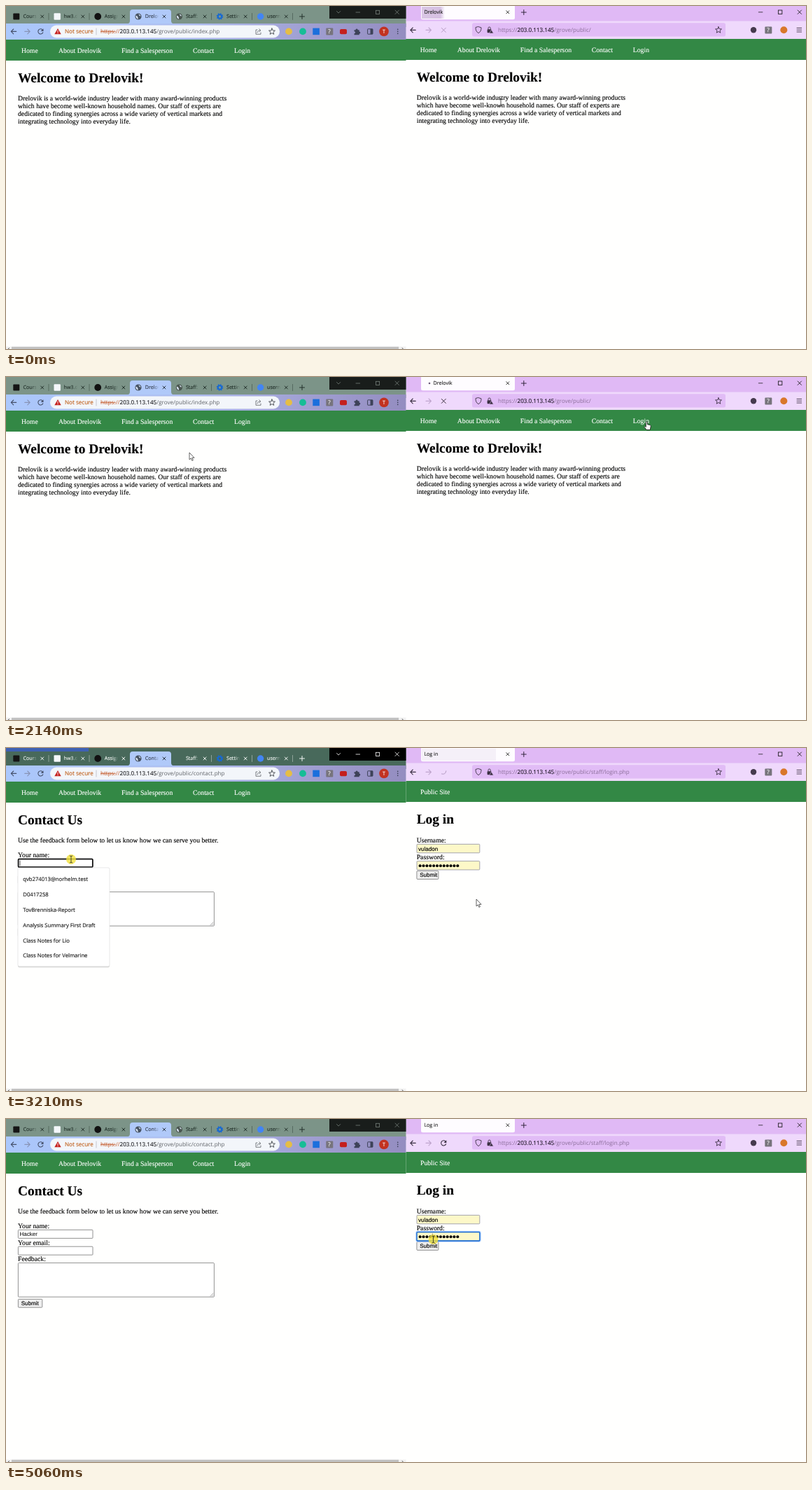
These frames come from a looping animation (1143 by 490 pixels, 8000 ms). An HTML page:

```html
<!DOCTYPE html>
<html lang="en">
<head>
<meta charset="utf-8">
<title>Two browsers</title>
<style>
  html, body { margin: 0; width: 100%; height: 100%; overflow: hidden; background: #fffffe; }
  svg { display: block; width: 1143px; height: 490px; text-rendering: geometricPrecision; }
  text { white-space: pre; stroke-width: .14px; }
  .page { font: 9.71px "Liberation Serif", "Times New Roman", serif; }
  .h1 { font: bold 19.4px "Liberation Serif", "Times New Roman", serif; }
  .ui { font: 8.08px "Open Sans", "Noto Sans", sans-serif; }
  .tab { font: 7.1px "Open Sans", "Noto Sans", sans-serif; }
  .menu { font: 7.7px "Open Sans", "Noto Sans", sans-serif; }
  .field { font: 8.05px "Liberation Sans", Arial, sans-serif; }
  .line { fill: none; stroke-linecap: round; stroke-linejoin: round; }
</style>
</head>
<body>
<svg id="stage" viewBox="0 0 1143 490" xmlns="http://www.w3.org/2000/svg"></svg>
<script>
const LOOP = 8000;
const BRAND = "Drelovik";
const HOST = "203.0.113.145";

// Drawing helpers; "on" lists the time spans in which a group is visible.
const text = (x, y, s, cls = "page", fill = "#000") =>
  `<text x="${x}" y="${y}" class="${cls}" fill="${fill}" stroke="${fill}">${s}</text>`;
const rect = (x, y, w, h, fill, more = "") =>
  `<rect x="${x}" y="${y}" width="${w}" height="${h}" fill="${fill}" ${more}/>`;
const dot = (x, y, r, fill, more = "") =>
  `<circle cx="${x}" cy="${y}" r="${r}" fill="${fill}" ${more}/>`;
const line = (d, color, w = 1, more = "") =>
  `<path class="line" d="${d}" stroke="${color}" stroke-width="${w}" ${more}/>`;
const at = (x, y, body) => `<g transform="translate(${x} ${y})">${body}</g>`;
const on = (spans, body) => `<g data-on="${spans}">${body}</g>`;

// Icons
const cross = (x, y, r, c, w = 1) =>
  line(`M${x - r} ${y - r}l${2 * r} ${2 * r}m0 ${-2 * r}l${-2 * r} ${2 * r}`, c, w);
const plus = (x, y, c) => line(`M${x - 3.5} ${y}h7m-3.5 -3.5v7`, c);
const back = (x, y, c) => line(`M${x + 3.7} ${y}h-7.4m3.4 -3.4l-3.4 3.4l3.4 3.4`, c, 1.1);
const forward = (x, y, c) => line(`M${x - 3.7} ${y}h7.4m-3.4 -3.4l3.4 3.4l-3.4 3.4`, c, 1.1);
const reload = (x, y, c) => at(x, y,
  line("M3.3 1.3A3.6 3.6 0 1 1 2.6 -2.5", c, 1.1) + `<path d="M4 -4.2v3.8h-3.8z" fill="${c}"/>`);
const globe = (x, y, c) => at(x, y, dot(0, 0, 4.6, c) +
  `<path d="M-3.6 -1.6Q-1 -1 -.8 .8L-.2 3.6Q-3.6 3 -3.6 -1.6M.3 -3.6Q1.2 -1.8 2 -.7L3.6 -.5Q3 -3 .3 -3.6" fill="#dbe6f5"/>`);
const star = (x, y, c) => {
  const pts = [...Array(10)].map((_, i) => {
    const r = i % 2 ? 2.1 : 4.7, a = i * Math.PI / 5;
    return `${(x + r * Math.sin(a)).toFixed(2)} ${(y - r * Math.cos(a)).toFixed(2)}`;
  });
  return line(`M${pts.join("L")}Z`, c, 0.9);
};
const gear = (x, y, c) => dot(x, y, 2.7, "none", `stroke="${c}" stroke-width="2"`) +
  dot(x, y, 4, "none", `stroke="${c}" stroke-width="1.6" stroke-dasharray="1.6 1.54"`);
const help = (x, y) => rect(x - 5, y - 5, 10, 10, "#77747c", 'rx="1"') +
  text(x - 2, y + 3, "?", "ui", "#fff");

const address = (x, y, path, hostFill, strike) => {
  const scheme = strike ? `<tspan fill="#c45a2a" text-decoration="line-through">https:</tspan>` +
    `<tspan fill="#c45a2a">//</tspan>` : `<tspan fill="#8a6d98">https://</tspan>`;
  const tail = strike ? "#5f6368" : "#8a6d98";
  return `<text x="${x}" y="${y}" class="ui">${scheme}` +
    `<tspan fill="${hostFill}" stroke="${hostFill}">${HOST}</tspan>` +
    `<tspan fill="${tail}">/grove/public/${path}</tspan></text>`;
};

// Pages
const siteNav = width => rect(0, 48, width, 30, "#338845") +
  [[22, "Home"], [75, `About ${BRAND}`], [165, "Find a Salesperson"], [267, "Contact"], [326, "Login"]]
    .map(([x, s]) => text(x, 66.8, s, "page", "#fff")).join("");
const home = navWidth => siteNav(navWidth) +
  text(17, 108.5, `Welcome to ${BRAND}!`, "h1") +
  [`${BRAND} is a world-wide industry leader with many award-winning products`,
   "which have become well-known household names. Our staff of experts are",
   "dedicated to finding synergies across a wide variety of vertical markets and",
   "integrating technology into everyday life."]
    .map((s, i) => text(17, 135.2 + i * 10.95, s)).join("");

const box = (x, y, w, h, fill = "#fff", color = "#767676", sw = 0.8) =>
  rect(x, y, w, h, fill, `rx="1" stroke="${color}" stroke-width="${sw}"`);
const button = (x, y, w) => box(x, y, w, 11.8, "#efefef") + text(x + 4.3, y + 8.8, "Submit", "field");

const suggestions = () =>
  rect(17, 172, 131, 141.5, "#000", 'rx="2" opacity=".16"') +
  rect(17, 171, 131, 141, "#fff", 'rx="2" stroke="#d8d8d8" stroke-width=".6"') +
  ["qvb274013@norhelm.test", "D0417258", "TovBrenniska-Report",
   "Analysis Summary First Draft", "Class Notes for Lio", "Class Notes for Velmarine"]
    .map((s, i) => text(24.3, 190.2 + i * 21.85, s, "menu", "#1c1c1c")).join("");

const contact = () => siteNav(571.5) +
  text(17, 108.5, "Contact Us", "h1") +
  text(17, 135.2, "Use the feedback form below to let us know how we can serve you better.") +
  text(17, 156.2, "Your name:") + box(17.4, 158.4, 106.6, 12) +
  text(17, 179.6, "Your email:") + box(17.4, 182.2, 106.6, 12) +
  text(17, 203.2, "Feedback:") + box(17.4, 205.6, 280, 48.6) +
  line("M292 253l4 -4m-1.6 4l1.6 -1.6", "#777", 0.6) + button(17.4, 257.4, 34.4) +
  on("3210-5060", rect(17.6, 158.6, 106.2, 11.6, "#fff", 'rx="1.2" stroke="#101010" stroke-width="1.7"')) +
  `<text id="typed" x="19.4" y="167.2" class="field"></text>` +
  on("3210-3730", line("M20 161v7", "#222", 0.7)) +
  on("4000-4530", line("M45.8 161v7", "#222", 0.7)) +
  on("3210-4000", suggestions()) +
  on("4000-4260", `<g opacity=".62">${at(1, 1, suggestions())}</g>`);

const bullets = () => [...Array(12)].map((_, i) => dot(591.6 + i * 4.88, 168.2, 2, "#000")).join("");
const login = () => rect(571.5, 47, 571.5, 30, "#338845") +
  text(592, 66, "Public Site", "page", "#fff") +
  text(586.7, 107.7, "Log in", "h1") +
  text(586.7, 134.6, "Username:") + box(587, 137.4, 89.8, 12.4, "#fdf8c8", "#8f8f9d") +
  text(589, 146.7, "vuladon", "field") +
  text(586.7, 159, "Password:") + box(587, 161.6, 89.8, 12.4, "#fdf8c8", "#8f8f9d") +
  button(586.9, 175.6, 31) +
  on("4000-", rect(586.2, 160.7, 91.6, 14.2, "none", 'rx="2.5" stroke="#a9cdfa" stroke-width="1.8"') +
    box(587, 161.6, 89.8, 12.4, "#fdf8c8", "#0a5fd0", 1.3) + line("M609.3 164v8", "#333", 0.6)) +
  bullets();

// Left browser
const ACTIVE = "2400-5060", IDLE = "0-2400 5060-";
const tabs = ["Course", "hw3.do", "Assignm", null, "Staff: L", "Settings", "userna"];
const tabX = i => 15 + i * 58.1;
const tabTexts = fill => tabs.map((s, i) => s ? `<g clip-path="url(#tab${i})" mask="url(#fade${i})">` +
  text(tabX(i) + 9.5, 17.3, s, "tab", fill) + "</g>" : "").join("");
const closers = c => tabs.map((s, i) => s ? cross(tabX(i) + 36.7, 15, 2, c, 1) : "").join("");
const dividers = c => [61, 119, 293.5, 351.5, 409.5]
  .map(x => line(`M${x} 10.5v9`, c, 0.7, 'opacity=".6"')).join("");
const winButtons = (bg, c) => rect(462, 0, 109.5, 18, bg) +
  line("M472.5 7.5l2.6 2.6l2.6 -2.6M500 9h5.6", c, 0.8) +
  rect(528.4, 6.3, 5.2, 5.2, "none", `stroke="${c}" stroke-width=".8"`) + cross(558.7, 8.8, 2.7, c, 0.8);
const strip = (bg, ink, btnBg, btnInk) => rect(0, 0, 571.5, 30, bg) + dividers(ink) +
  tabTexts(ink) + closers(ink) + plus(423, 15, ink) + winButtons(btnBg, btnInk);

const leftChrome = () => {
  const ink = "#45506a";
  return on(IDLE, strip("#7c9488", "#22302a", "#191d1b", "#77807b") + globe(tabX(4), 15, "#4a5650")) +
    on(ACTIVE, strip("#48695b", "#f2f6f4", "#000", "#fff") + rect(0, 0, 118, 5, "#3f61b3")) +
    rect(10.3, 10.5, 9, 9, "#151515", 'rx="1"') + rect(68.5, 10.3, 9.4, 9.4, "#f4f7fb", 'rx="1"') +
    dot(tabX(2), 15, 4.9, "#111") + gear(tabX(5), 15, "#1769d2") + dot(tabX(6), 15, 4.7, "#4285f4") +
    rect(0, 25, 571.5, 23, "url(#bar)") +
    `<path d="M173 25.2q4 0 4 -4V9q0 -4 4 -4h51q4 0 4 4v12.2q0 4 4 4z" fill="#b0c9f9"/>` +
    on("0-2400 2660-", globe(189, 15, "#475364")) +
    `<g clip-path="url(#tab3)" mask="url(#fade3)">` +
    on("0-2660", text(198.8, 17.3, BRAND, "tab", "#333c4c")) +
    on("2660-", text(198.8, 17.3, "Contact", "tab", "#333c4c")) + "</g>" + cross(226, 15, 2, "#2f3848", 1) +
    back(11, 36.4, ink) + forward(30.5, 36.4, "#8793b5") +
    on("0-2400 2660-", reload(49.5, 36.4, ink)) + on("2400-2660", cross(49.5, 36.4, 3, ink, 1.1)) +
    rect(63, 27.6, 328, 17.8, "#f3f6fa", 'rx="8.9"') +
    `<path d="M74 32l4.7 8.3h-9.4z" fill="#c5221f"/>` + line("M74 35v2.4m0 1.4v.2", "#fff", 0.9) +
    text(84, 39.3, "Not secure", "ui", "#c0611c") + line("M129 32v9", "#b9bcc4", 0.8) +
    on("0-2660", address(135, 39.3, "index.php", "#202124", true)) +
    on("2660-", address(135, 39.3, "contact.php", "#202124", true)) +
    line("M359 34h-2v6.3h7v-2.3M359 38q.4 -3.2 4.6 -3.2m-1.8 -2l2 2l-2 2", "#5f6368", 0.8) +
    star(380, 36.6, "#44484d") +
    dot(404, 36.4, 4.9, "#e5bd46") + dot(424, 36.4, 4.9, "#16bd96") +
    rect(438.3, 31.6, 9.6, 9.6, "#1b6fdc") + help(462.3, 36.4) +
    rect(477, 33, 10, 7.2, "#c4201d", 'rx="2"') +
    `<path d="M497.5 34.2h2a1.6 1.6 0 1 1 3.2 0h2v2.3a1.6 1.6 0 1 1 0 3.2v1.5h-7.2v-2a1.5 1.5 0 1 0 0 -3z" fill="#3d4258"/>` +
    rect(516.6, 32.8, 7.4, 7.4, "none", 'rx=".6" stroke="#3d4258"') + rect(520.5, 32.8, 3.5, 7.4, "#3d4258") +
    dot(540, 36.4, 6.8, "#c23321") + text(538.1, 39.1, "T", "tab", "#fff") +
    [-3, 0, 3].map(d => dot(559.7, 36.4 + d, 0.8, "#3d4258")).join("") +
    rect(0, 486.5, 571.5, 3.5, "#f1f1f1") + rect(8, 486.8, 553, 3.2, "#c1c1c1") +
    line("M4.5 488.7l-1.5 1.3M566 488.7l1.5 1.3", "#333", 0.9) +
    on("2400-2660", rect(-2, 484, 159, 10, "#92aa9f", 'rx="2"') +
      text(2, 492.5, `https://${HOST}/grove/public/contact.php`, "tab", "#5d7469"));
};

// Right browser
const rightChrome = () => {
  const ink = "#3b3042", pale = "#b49bc2";
  return rect(571.5, 0, 571.5, 22, "#e0b9f5") + rect(571.5, 21.5, 571.5, 25.5, "#efd9fc") +
    rect(593, -4, 134, 23.3, "#fefcff", 'rx="2.5"') +
    on("0-260 2930-3210", rect(594, 1, 33, 17, "url(#burst)")) +
    on("260-540 3210-3470", rect(594, 1, 106, 17, "#f5f0f8")) +
    on("0-1870", text(597.4, 11.4, BRAND, "tab", "#222")) +
    on("1870-2930", dot(605, 9, 1.3, "#6b5a78") + text(610.6, 11.4, BRAND, "tab", "#222")) +
    on("2930-", text(597.4, 11.4, "Log in", "tab", "#222")) +
    cross(716.8, 8.8, 2, "#222", 0.9) + plus(739.8, 9, "#33263c") +
    line("M1075.3 8.8h5.6", "#222", 0.8) +
    rect(1103.4, 6, 5.4, 5.4, "none", 'stroke="#222" stroke-width=".9"') + cross(1133.8, 8.7, 2.7, "#222", 0.9) +
    back(581.5, 34.4, ink) + forward(603.7, 34.4, "#bfa5cd") +
    on("0-260 2930-3210", cross(625.3, 34.4, 3, pale)) +
    on("260-1340 3470-4260", reload(625.3, 34.4, pale)) +
    on("1340-1870 4260-", reload(625.3, 34.4, ink)) +
    on("1870-2930", cross(625.3, 34.4, 3, ink)) +
    on("3210-3470", line("M622.5 37q5.5 1.6 6.3 -4.2", pale)) +
    rect(666, 24.2, 362, 19.4, "#e1bcf6", 'rx="2.5"') +
    line("M675 29.6l4 1.3q.2 5.5 -4 7.8q-4.2 -2.3 -4 -7.8z", ink, 0.9) +
    rect(687.6, 33.2, 6, 5, ink, 'rx=".8"') + line("M689 33v-1.4a1.6 1.6 0 0 1 3.2 0v1.4", ink, 0.9) +
    `<path d="M693.5 34l3 5h-6z" fill="${ink}" stroke="#e1bcf6" stroke-width=".6"/>` +
    on("0-2930", address(703, 37.3, "", "#1e1624")) +
    on("2930-", address(703, 37.3, "staff/login.php", "#1e1624")) +
    star(1018, 34.4, ink) + dot(1068, 34.2, 4.2, "#463a4e") + help(1089.3, 34.4) + dot(1111.3, 34.2, 5, "#d9772b") +
    line("M1130 31.4h6.6m-6.6 2.8h6.6m-6.6 2.8h6.6", ink, 0.9);
};

const fades = tabs.map((_, i) => {
  const x = tabX(i) + 9;
  return `<clipPath id="tab${i}">${rect(x, 5, 20, 20, "#fff")}</clipPath>` +
    `<mask id="fade${i}" maskUnits="userSpaceOnUse" x="${x}" y="5" width="20" height="20">` +
    rect(x, 5, 20, 20, "url(#soft)") + "</mask>";
}).join("");
const gradient = (id, stops) => `<linearGradient id="${id}">` +
  stops.map(([o, c]) => `<stop offset="${o}" stop-color="${c}"/>`).join("") + "</linearGradient>";

const stage = document.getElementById("stage");
stage.innerHTML = "<defs>" + fades +
  gradient("soft", [[0, "#fff"], [0.6, "#fff"], [1, "#000"]]) +
  gradient("bar", [[0, "#abc8fc"], [0.45, "#acbcee"], [0.75, "#a09fd2"], [1, "#948dc0"]]) +
  gradient("burst", [[0, "#d9c6e4"], [0.8, "#d6c0e2"], [1, "#fefcff"]]) + "</defs>" +
  rect(0, 0, 1143, 490, "#fffffe") +
  on("0-2930", at(569.8, -1, home(573.2))) + on("2930-", login()) + rightChrome() +
  on("0-2660", home(571.5)) + on("2660-", contact()) + leftChrome() +
  `<g id="left"></g><g id="right"></g>`;

// Pointers, with the hot spot at the origin
const pointers = {
  none: "",
  beam: line("M-1.8 -5q1.8 0 1.8 1q0 -1 1.8 -1M0 -4v8M-1.8 5q1.8 0 1.8 -1q0 1 1.8 1", "#222", 0.8),
  arrow: `<path d="M0 0v10l2.3 -2l1.5 3.5l1.6 -.7l-1.5 -3.4h3.1z" fill="#fff" stroke="#222" stroke-width=".7"/>`,
  hand: `<path d="M-1.7 -5.4q1.1 -1.2 2 0v3.6l4 .9q1.2 .5 .9 2.2l-.9 4.7h-5l-3.4 -4.2q.3 -1.5 1.6 -.6l.8 .7z" fill="#fff" stroke="#111" stroke-width=".8"/>`
};
const glow = dot(0, 0, 7, "#f3e23c", 'opacity=".8"');

// Each entry holds until the next: time, pointer, x, y, pressed
const tracks = {
  left: [[0, "none"], [260, "beam", 213, 165], [540, "beam", 160, 150], [810, "beam", 135, 140],
    [1340, "beam", 100, 139], [1600, "arrow", 223, 50], [1870, "arrow", 240, 119],
    [2140, "arrow", 262, 108], [2400, "hand", 292, 68.5], [2660, "arrow", 230, 112],
    [2930, "beam", 110, 150], [3210, "beam", 93, 159, 1], [3470, "beam", 88, 162.5], [4530, "none"]],
  right: [[0, "beam", 707, 138], [260, "beam", 770, 158], [540, "beam", 810, 140],
    [810, "arrow", 880, 71], [1340, "hand", 903, 67], [1600, "hand", 916, 69.5],
    [2400, "beam", 820, 131], [2660, "beam", 760, 160], [2930, "arrow", 700, 198],
    [3210, "arrow", 672, 216], [3470, "beam", 625, 178], [3730, "beam", 612, 171],
    [4000, "beam", 610.5, 172, 1]],
  typed: [[0, ""], [3730, "Ha"], [4000, "Hacker"]]
};
const current = (name, t) => tracks[name].filter(k => k[0] <= t).pop();

const timed = [...stage.querySelectorAll("[data-on]")].map(el => ({
  el,
  spans: el.dataset.on.split(" ").map(s => {
    const [a, b] = s.split("-");
    return [+a, b ? +b : LOOP];
  })
}));
const pointerEls = ["left", "right"].map(name => [name, document.getElementById(name)]);
const typed = document.getElementById("typed");

function draw(t) {
  for (const { el, spans } of timed)
    el.style.display = spans.some(([a, b]) => t >= a && t < b) ? "" : "none";
  for (const [name, el] of pointerEls) {
    const [, kind, x = 0, y = 0, pressed] = current(name, t);
    el.setAttribute("transform", `translate(${x} ${y})`);
    el.innerHTML = (pressed ? glow : "") + pointers[kind];
  }
  typed.textContent = current("typed", t)[1];
}

const start = performance.now();
function tick() {
  draw((performance.now() - start) % LOOP);
  requestAnimationFrame(tick);
}
tick();
</script>
</body>
</html>
```
